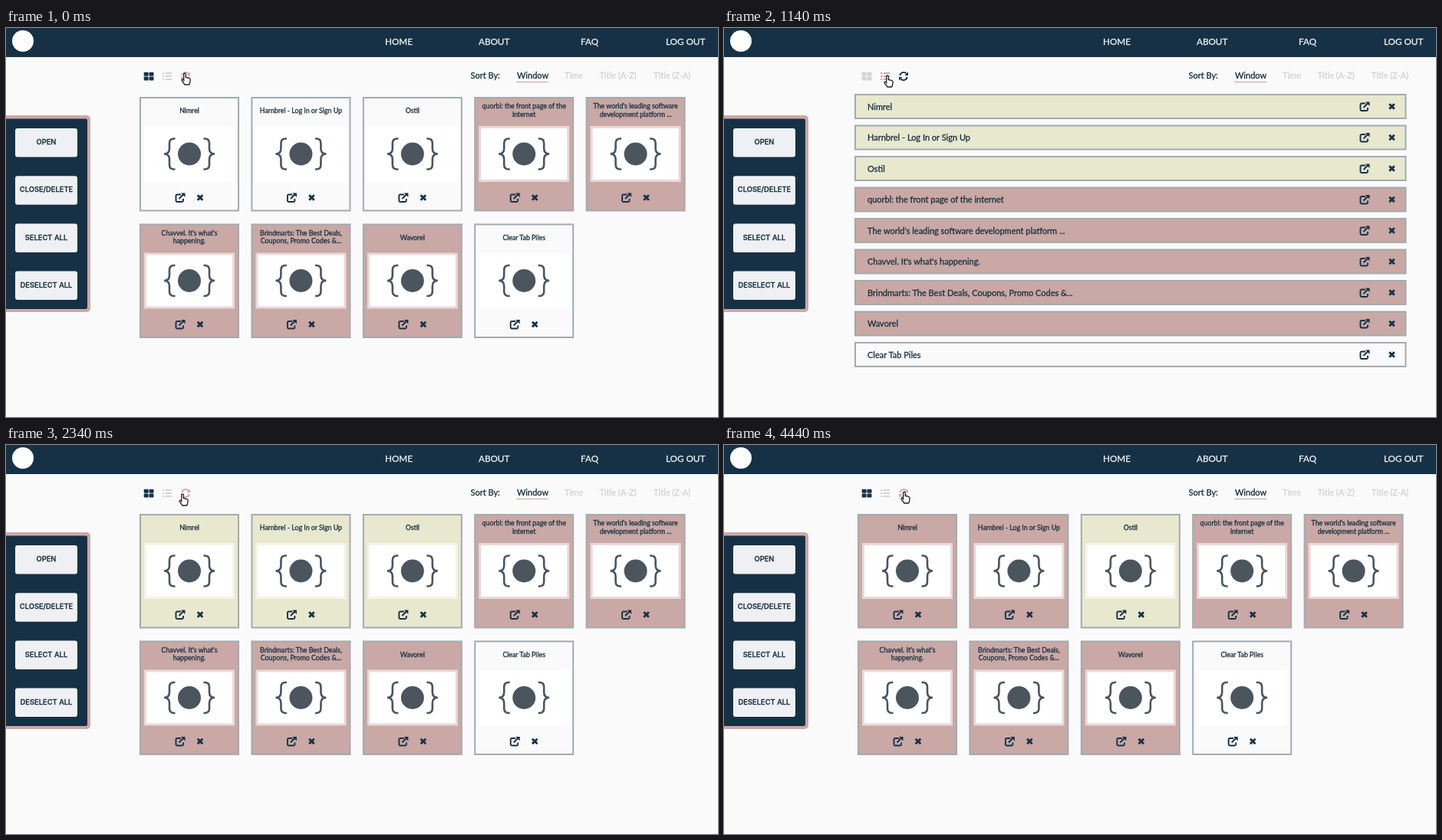
Write an HTML page that moves like this. It is 928 px wide and 508 px high and loops after 4.5 s.

```html
<!DOCTYPE html>
<html lang="en">
<head>
<meta charset="utf-8">
<title>Tab manager</title>
<style>
  html, body { margin: 0; width: 100%; height: 100%; overflow: hidden; background: #fafafa; }
  svg { display: block; width: 100%; height: 100%; }
  text { font: 11px Lato, sans-serif; fill: #19303f; stroke: #19303f; stroke-width: .3; }
  .nav { font-size: 11.7px; fill: #eef1f3; stroke: #eef1f3; }
  .dim { fill: #d2d2d2; stroke: #d2d2d2; }
  .title { font-size: 8.8px; text-anchor: middle; }
  .button { font: 500 9.4px Inter, sans-serif; text-anchor: middle; }
  .box { stroke: #a3abaf; stroke-width: 2; }
  .thumb { fill: #fff; stroke-width: 3; }
</style>
</head>
<body>
<svg id="stage" viewBox="0 0 928 508">
  <defs>
    <g id="open" fill="none" stroke="#163145" stroke-width="1.9">
      <path d="M1-4H-4a1.5 1.5 0 0 0-1.5 1.5V4A1.5 1.5 0 0 0-4 5.5H2.5A1.5 1.5 0 0 0 4 4V1.5M-1.5 1.5 4-4"/>
      <path d="M1-6H6.5V-.5z" fill="#163145" stroke="none"/>
    </g>
    <path id="close" d="M-3.3-3.3 3.3 3.3M3.3-3.3-3.3 3.3" stroke="#163145" stroke-width="2.8"/>
    <path id="brace" d="M-18.500-20h-1.500q-6 0-6 6v7q0 7-7 7q7 0 7 7v7q0 6 6 6h1.500" fill="none" stroke="#4b555d" stroke-width="2.600"/>
    <g id="picture">
      <use href="#brace"/>
      <use href="#brace" transform="scale(-1 1)"/>
      <circle r="15" fill="#4b555d"/>
    </g>
  </defs>
  <rect width="928" height="38" fill="#163145"/>
  <circle cx="22" cy="17" r="14" fill="#fff"/>
  <g id="labels"></g>
  <path d="M665 70.500H707" stroke="#cf9f9c" stroke-width="1.200"/>
  <path d="M0 114H105a5 5 0 0 1 5 5V366a5 5 0 0 1-5 5H0z" fill="#cba8a6"/>
  <path d="M0 118.500H104a2 2 0 0 1 2 2V365a2 2 0 0 1-2 2H0z" fill="#163145"/>
  <g id="buttons"></g>
  <g id="gridIcon">
    <rect x="179.700" y="57.800" width="6" height="5" rx="1"/>
    <rect x="186.500" y="57.800" width="6" height="5" rx="1"/>
    <rect x="179.700" y="63.600" width="6" height="5" rx="1"/>
    <rect x="186.500" y="63.600" width="6" height="5" rx="1"/>
  </g>
  <g id="listIcon">
    <path d="M204 58h2.400v2h-2.400zM208 58h8v2h-8zM204 62h2.400v2h-2.400zM208 62h8v2h-8zM204 66h2.400v2h-2.400zM208 66h8v2h-8z"/>
  </g>
  <g id="refreshIcon">
    <path d="M229.300 62A4.900 4.900 0 0 1 237.800 59.600M238.700 64A4.900 4.900 0 0 1 230.200 66.400" fill="none" stroke-width="1.900"/>
    <path d="M240 57.500V62H235.500zM228 68.500V64H232.500z" stroke="none"/>
  </g>
  <g id="gridView"></g>
  <g id="listView"></g>
  <g id="cursor">
    <path id="hand" d="M-1.300 1.300a1.300 1.300 0 0 1 2.600 0V5.500l4.500 1.200c1 .3 1.500 1 1.400 2L6.600 12.500 5.600 15H0L-3.800 9.800c-.6-1.200.6-2 1.500-1.200l1 1z" fill="#fff" stroke="#222" stroke-width="1.300"/>
    <path id="arrow" d="M0 0V11l2.500-2.300L4.200 12.500l2-.9L4.500 7.900H8z" fill="#111" stroke="#fff" stroke-width=".7"/>
  </g>
</svg>
<script>
const LOOP = 4500;
const NAVY = '#163145', GREY = '#d4d4d4', HOVER = '#d0a6a1';
const WHITE = ['#fafafa', '#fff'], YELLOW = ['#e8e8cf', '#f4f4e8'], PINK = ['#c9a8a6', '#ead9d8'];

// Each title is split where its card wraps.
const tabs = [
  ['Nimrel'],
  ['Harnbrel - Log In or Sign Up'],
  ['Ostil'],
  ['quorbl: the front page of the', 'internet'],
  ["The world's leading software", 'development platform ...'],
  ["Chavvel. It's what's", 'happening.'],
  ['Brindmarts: The Best Deals,', 'Coupons, Promo Codes &amp;...'],
  ['Wavorel'],
  ['Clear Tab Piles']
];

// Pointer stops: time, x, y of the fingertip.
const stops = [
  [0, 233, 59], [480, 233, 59], [840, 213, 62], [1200, 213, 62],
  [1620, 190, 64], [1980, 190, 64], [2280, 230, 64], [2700, 230, 64],
  [2880, 229, 63], [3420, 229, 63], [3720, 235, 61], [4440, 235, 61], [4500, 233, 59]
];

const $ = id => document.getElementById(id);
const text = (x, y, s, kind = '') => `<text x="${x}" y="${y}" class="${kind}">${s}</text>`;
const use = (id, x, y) => `<use href="#${id}" x="${x}" y="${y}"/>`;

function card(lines, i) {
  const x = 174 + i % 5 * 145.4, y = i < 5 ? 90 : 255.5;
  const top = lines.length > 1 ? 15 : 21;
  return `<g transform="translate(${x} ${y})">
    <rect class="box" x="1" y="1" width="128" height="147.5"/>
    <rect class="thumb" x="7.500" y="39.500" width="115" height="70"/>
    ${use('picture', 65, 74.5)}
    ${lines.map((line, n) => text(65, top + n * 10.7, line, 'title')).join('')}
    ${use('open', 53, 131.5)}${use('close', 79, 131.5)}</g>`;
}

function row(lines, i) {
  return `<g transform="translate(170 ${86 + i * 40.5})">
    <rect class="box" x="1" y="1" width="717.5" height="31"/>
    ${text(17, 20.5, lines.join(' '))}
    ${use('open', 665, 16.5)}${use('close', 700.5, 16.5)}</g>`;
}

$('labels').innerHTML =
  [[494, 'HOME'], [616, 'ABOUT'], [749, 'FAQ'], [860, 'LOG OUT']]
    .map(([x, s]) => text(x, 21.5, s, 'nav')).join('') +
  [[605.5, 'Sort By:'], [666, 'Window'], [728, 'Time', 'dim'], [773.5, 'Title (A-Z)', 'dim'], [844, 'Title (Z-A)', 'dim']]
    .map(([x, s, kind]) => text(x, 65.7, s, kind)).join('');
$('buttons').innerHTML = ['OPEN', 'CLOSE/DELETE', 'SELECT ALL', 'DESELECT ALL'].map((s, i) => {
  const y = 131 + i * 62.2;
  return `<rect x="12" y="${y}" width="81" height="37.5" rx="3" fill="#eff0f3"/>` +
    text(52.5, y + 21.2, s, 'button');
}).join('');
$('gridView').innerHTML = tabs.map(card).join('');
$('listView').innerHTML = tabs.map(row).join('');

function tabColor(i, t) {
  if (i === 8) return WHITE;
  if (i > 2) return PINK;
  if (t < 240) return WHITE;
  return t >= 4200 && i < 2 ? PINK : YELLOW;
}

function pointer(t) {
  const n = stops.findIndex(s => s[0] > t);
  const [t0, x0, y0] = stops[n - 1], [t1, x1, y1] = stops[n];
  const p = (t - t0) / (t1 - t0), e = p * p * (3 - 2 * p);
  return [x0 + (x1 - x0) * e, y0 + (y1 - y0) * e];
}

function paint(id, color) {
  $(id).setAttribute('fill', color);
  $(id).setAttribute('stroke', id === 'refreshIcon' ? color : 'none');
}

function show(id, visible) {
  $(id).style.display = visible ? '' : 'none';
}

function draw(now) {
  const t = now % LOOP;
  const list = t >= 1020 && t < 1920;
  const [x, y] = pointer(t);
  show('listView', list);
  show('gridView', !list);
  for (const view of ['gridView', 'listView']) {
    [...$(view).children].forEach((tab, i) => {
      const [fill, frame] = tabColor(i, t);
      tab.querySelector('.box').setAttribute('fill', fill);
      tab.querySelector('.thumb')?.setAttribute('stroke', frame);
    });
  }
  paint('gridIcon', x < 199 ? HOVER : list ? GREY : NAVY);
  paint('listIcon', x > 202 && x < 220 ? HOVER : list ? NAVY : GREY);
  paint('refreshIcon', x > 225 ? HOVER : NAVY);
  const arrow = t >= 2760 && t < 3480;
  show('arrow', arrow);
  show('hand', !arrow);
  $('cursor').setAttribute('transform', `translate(${x} ${y})`);
  requestAnimationFrame(draw);
}
requestAnimationFrame(draw);
</script>
</body>
</html>
```
